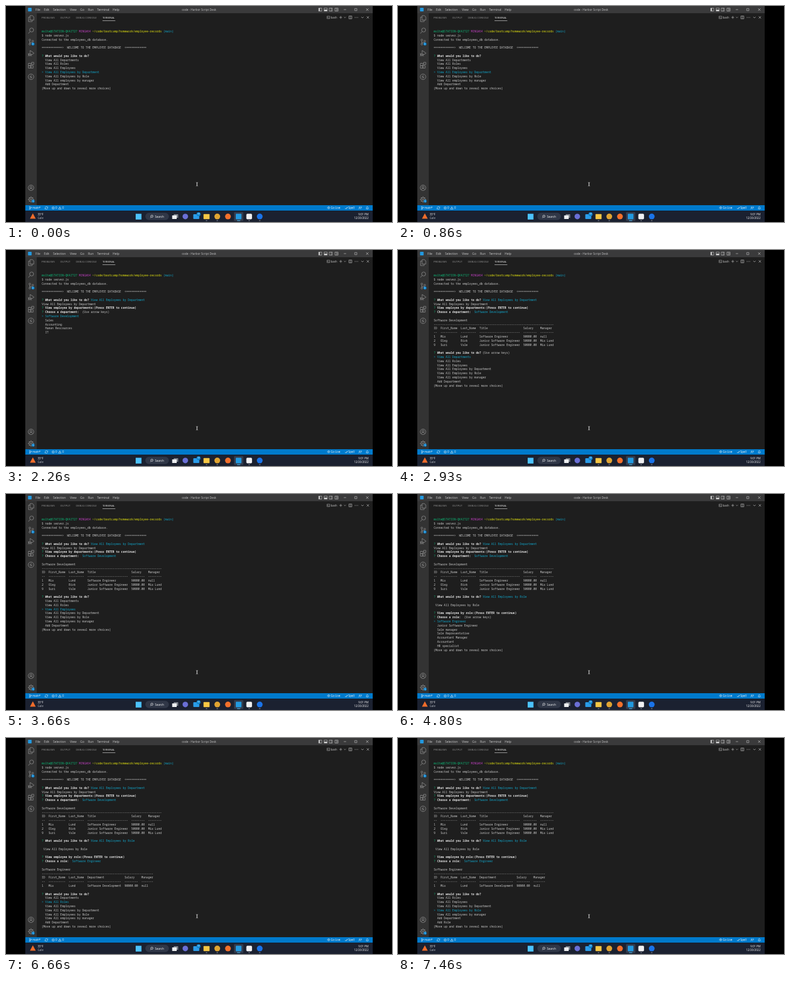
Write an HTML page with a canvas that moves like this. It is 640x360 px and loops after 8 s.

```html
<!DOCTYPE html>
<html lang="en">
<head>
<meta charset="utf-8">
<title>Terminal session</title>
<style>
html, body { margin: 0; width: 100%; height: 100%; overflow: hidden; background: #000; }
canvas { display: block; }
</style>
</head>
<body>
<canvas id="stage" width="640" height="360"></canvas>
<script>
const ctx = document.getElementById('stage').getContext('2d');
const LOOP = 8000;
const UI = '"Open Sans", sans-serif', MONO = '"Noto Sans Mono", monospace';
const PLAIN = '#cccccc', BOLD = '#e5e5e5', GREEN = '#0dbc79', CYAN = '#11a8cd',
      PURPLE = '#bc3fbc', YELLOW = '#e5e510', BLUE = '#007acc', GREY = '#9a9a9a';
const COLUMN = 2.8, ROW = 6.8;

// ---- drawing helpers ----
function rect(x, y, w, h, color, radius = 0) {
  ctx.fillStyle = color;
  ctx.beginPath();
  ctx.roundRect(x, y, w, h, radius);
  ctx.fill();
}

function disc(x, y, r, color) {
  ctx.fillStyle = color;
  ctx.beginPath();
  ctx.arc(x, y, r, 0, 7);
  ctx.fill();
}

function icon(x, y, path, color = PLAIN, width = 0.6) {
  ctx.save();
  ctx.translate(x, y);
  ctx.strokeStyle = color;
  ctx.lineWidth = width;
  ctx.stroke(new Path2D(path));
  ctx.restore();
}

const circle = (x, y, r) => `M${x + r} ${y}a${r} ${r} 0 1 0 ${-2 * r} 0a${r} ${r} 0 1 0 ${2 * r} 0`;
const box = (x, y, w, h) => `M${x} ${y}h${w}v${h}h${-w}z`;

// Laid out at ten times the size so that small glyph advances are not rounded.
function text(str, x, y, color = PLAIN, size = 5, { font = UI, weight = 400, align = 'left' } = {}) {
  ctx.save();
  ctx.scale(0.1, 0.1);
  ctx.font = `${weight} ${size * 10}px ${font}`;
  ctx.textAlign = align;
  ctx.fillStyle = color;
  ctx.fillText(str, x * 10, y * 10);
  ctx.restore();
}

function badge(x, y, label, r = 2.5) {
  disc(x, y, r, '#0a84d0');
  text(label, x, y + 1.2, '#fff', 3.3, { align: 'center', weight: 600 });
}

// ---- window ----
function drawTitleBar() {
  rect(32, 0, 576, 12, '#3a3a3b');
  rect(36.5, 3, 6, 6, '#2299e0', 0.8);
  const menus = { File: 49, Edit: 63, Selection: 78, View: 106, Go: 123, Run: 136, Terminal: 151, Help: 177 };
  for (const name in menus) text(name, menus[name], 7.8);
  text('code - Harbor Script Desk', 320, 7.8, '#c4c4c4', 4.8, { align: 'center' });
  for (const x of [521, 530, 538.5, 548]) icon(x, 6, box(-2.6, -2.5, 5.2, 5));
  rect(518.6, 3.6, 2, 4.8, PLAIN);
  rect(527.6, 6, 4.8, 2.4, PLAIN);
  icon(538.5, 6, 'M.7-2.5v5');
  icon(548, 6, 'M0-2.5v5M0 0h2.6');
  icon(562, 6, 'M-2 0h4');
  icon(580, 6, box(-1.8, -1.8, 3.6, 3.6));
  icon(599, 6, 'M-2-2l4 4M2-2l-4 4');
}

function drawActivityBar() {
  rect(32, 12, 19, 320, '#333333');
  const x = 41.5, color = '#8e8e8e';
  icon(x, 21, 'M-1.6-5h4l2.2 2.2v5.2h-6.2zM-1.6-2.5h-2.6v7.5h6v-2.5', color, 0.8);
  icon(x, 41, circle(1, -1, 3.3) + 'M-1.4 1.4l-3 3.4', color, 0.8);
  icon(x, 60, circle(-2, -3.4, 1.4) + circle(-2, 3.6, 1.4) + circle(2.8, -1.4, 1.4) + 'M-2-2v4.2M2.8 0c0 1.6-4.8.6-4.8 2', color, 0.8);
  icon(x, 79, 'M-1.5-1v-4l6.5 4.6-4.5 3' + circle(-2, 2, 2) + 'M-5 0l1.4 1M-5 4.5l1.4-1M1 4.5l-1.4-1M-5 2h6', color, 0.8);
  icon(x, 98.5, box(-4.4, -3, 4, 4) + box(-4.4, 1, 4, 4) + box(-0.4, 1, 4, 4) + box(1, -4.6, 3.6, 3.6), color, 0.8);
  icon(x, 118, circle(0, 0, 4.6) + 'M.8-3l-2.6 3.4h3.4l-2.4 2.8', color, 0.8);
  icon(x, 303, circle(0, 0, 4.6) + circle(0, -1, 1.7) + 'M-3 3.3c.6-3 5.4-3 6 0', color, 0.8);
  icon(x, 322.5, circle(0, 0, 3.5) + circle(0, 0, 1.3) + 'M0-5v1.5M0 3.5v1.5M-5 0h1.5M3.5 0h1.5M-3.5-3.5l1 1M2.5 2.5l1 1M-3.5 3.5l1-1M2.5-2.5l1-1', color, 0.9);
  badge(44.7, 63.3, '1');
  badge(45, 325.3, '1');
}

function drawPanelTabs() {
  const tabs = { PROBLEMS: 59, OUTPUT: 90, 'DEBUG CONSOLE': 116, TERMINAL: 160 };
  for (const name in tabs) text(name, tabs[name], 20.7, name === 'TERMINAL' ? '#e7e7e7' : GREY, 4.2);
  rect(160, 24.2, 21.3, 0.6, '#e7e7e7');
  icon(534.5, 19, box(-2.3, -2, 4.6, 4) + 'M-1.3-1l1 1-1 1M.2 1h1.2', PLAIN, 0.5);
  text('bash', 538.5, 20.7, PLAIN, 4.6);
  icon(555, 19, 'M-2.3 0h4.6M0-2.3v4.6');
  icon(562, 19, 'M-1.4-.7l1.4 1.4 1.4-1.4');
  icon(571, 19, box(-2.4, -2.3, 4.8, 4.6) + 'M0-2.3v4.6');
  for (const x of [578.8, 581, 583.2]) disc(x, 19, 0.5, PLAIN);
  icon(591, 19, 'M-2-1l2 2 2-2');
  icon(600, 19, 'M-1.9-1.9l3.8 3.8M1.9-1.9l-3.8 3.8');
}

function drawStatusBar() {
  rect(32, 332, 576, 9.2, BLUE);
  const white = '#fff', y = 336.6, base = 338.3;
  icon(40.5, y, circle(-1, -1.7, 0.7) + circle(-1, 1.7, 0.7) + circle(1.3, -0.8, 0.7) + 'M-1-1v2M1.3 0c0 .9-2.3.4-2.3 1', white, 0.5);
  text('main*', 44, base, white, 4.6);
  icon(67, y, 'M-2.2-.4a2.2 2.2 0 0 1 4.2-.4M2.2.4a2.2 2.2 0 0 1-4.2.4M2.3-2v1.4h-1.4M-2.3 2v-1.4h1.4', white, 0.5);
  icon(78.3, y, circle(0, 0, 2) + 'M-.8-.8l1.6 1.6M.8-.8l-1.6 1.6', white, 0.5);
  text('0', 82, base, white, 4.6);
  icon(89.2, y, 'M0-2l2.2 4h-4.4zM0-.7v1.3', white, 0.5);
  text('0', 93.2, base, white, 4.6);
  icon(535, y, circle(0, -0.3, 0.6) + 'M-1.2 1.2a1.9 1.9 0 1 1 2.4 0M0 .3v2', white, 0.5);
  text('Go Live', 538.6, base, white, 4.6);
  icon(564, y, 'M-2 .2l1.2 1.4 2.8-3.2M-.2 1l.6.6 2.4-3', white, 0.5);
  text('Spell', 567.5, base, white, 4.6);
  icon(587, y, circle(-0.6, -1, 0.9) + 'M-2.2 2c.2-2.4 3-2.4 3.2 0M1.2-1.8h1.2v1.8h-1.2', white, 0.5);
  icon(599, y, 'M-2 1.3h4l-.7-1v-1.1a1.3 1.3 0 0 0-2.6 0v1.1zM-.5 2.1h1', white, 0.5);
}

function drawTaskbar() {
  rect(32, 341.2, 576, 18.8, '#1b2130');
  ctx.fillStyle = '#ee6c2b';
  ctx.fill(new Path2D('M44.5 345.5l4.8 9h-9.6z'));
  text('33°F', 52.5, 349.2, '#fff', 4.5);
  text('Gale', 52.5, 355.2, '#b4b8c0', 4.5);

  rect(215, 346.3, 9.6, 9.6, '#4cc2ff');
  rect(231, 344.8, 39, 12, '#303747', 6);
  icon(241.5, 350.8, circle(0.4, -0.4, 1.8) + 'M-1 1l-1.4 1.4', '#fff', 0.7);
  text('Search', 247, 352.6, '#fff', 4.7);

  rect(378, 343.5, 15.5, 14.8, '#343c4d', 1.5);
  rect(278, 347, 7.5, 6, '#7c828c', 0.6);
  rect(275.5, 349, 7.5, 6, '#eceef0', 0.6);
  disc(297.3, 350.8, 4.6, '#6a6fd6');
  rect(310.5, 347, 10, 8, '#2a9be8', 1);
  rect(327.5, 346.8, 10, 8.4, '#f6c744', 0.8);
  disc(350.3, 350.8, 4.8, '#e0a432');
  disc(368, 350.8, 4.8, '#f3702b');
  rect(381, 346.2, 9.4, 9.4, '#2299e0', 1);
  rect(398.5, 346.2, 9.4, 9.4, '#f0f0f2', 1.8);
  disc(420.7, 350.8, 4.8, '#1a73e8');
  badge(319.3, 347, '17', 3.3);
  for (const x of [332.5, 350.3, 403.2, 420.7]) rect(x - 1.2, 357.3, 2.4, 0.9, '#9aa0aa', 0.4);
  rect(383, 357.3, 5.6, 0.9, '#4cc2ff', 0.4);

  text('9:01 PM', 601, 349.2, '#fff', 4.5, { align: 'right' });
  text('12/20/2022', 601, 355.2, '#fff', 4.5, { align: 'right' });
}

// ---- terminal ----
const ACTIONS = ['View All Departments', 'View All Roles', 'View All Employees',
  'View All Employees by Department', 'View All Employees by Role',
  'View All employees by manager', 'Add Department', 'Add Role'];
const DEPARTMENTS = ['Software Development', 'Sales', 'Accounting', 'Human Rescources', 'IT'];
const ROLES = ['Software Engineer', 'Junior Software Engineer', 'Sale manager',
  'Sale Representative', 'Accountant Manager', 'Accountant', 'HR specialist', 'IT specialist'];
const ARROWS = '(Use arrow keys)';

// Pairs of string and colour, set one after another.
function row(n, ...parts) {
  let column = 0;
  for (let i = 0; i < parts.length; i += 2) {
    const [str, color = PLAIN] = [parts[i], parts[i + 1]];
    text(str, 59.3 + column * COLUMN, 43.9 + n * ROW, color, COLUMN / 0.6,
      { font: MONO, weight: color === BOLD ? 700 : 400 });
    column += str.length;
  }
}

const ask = (n, question, tail = '', color = PLAIN) =>
  row(n, '? ', GREEN, question + ' ', BOLD, tail, color);

function list(n, items, selected = 0) {
  const first = Math.max(0, selected - 3), shown = items.slice(first, first + 7);
  shown.forEach((item, i) => {
    const active = first + i === selected;
    row(n + i, (active ? '> ' : '  ') + item, active ? CYAN : PLAIN);
  });
  if (items.length > 7) row(n + 7, '(Move up and down to reveal more choices)');
}

function mainMenu(n, selected) {
  ask(n, 'What would you like to do?', selected ? '' : ARROWS);
  list(n + 1, ACTIONS, selected);
}

function table(n, title, widths, records) {
  const line = cells => cells.map((cell, i) => cell.padEnd(widths[i])).join('  ');
  const rules = widths.map(w => '-'.repeat(w));
  row(n, title);
  row(n + 1, '-'.repeat(rules.join('  ').length));
  row(n + 2, line(records[0]));
  row(n + 3, line(rules));
  records.slice(1).forEach((record, i) => row(n + 4 + i, line(record)));
}

function drawTerminal(t) {
  const presses = times => times.filter(ms => t >= ms).length;

  row(0, 'molte@STATION-QK4ZT27 ', GREEN, 'MINGW64 ', PURPLE,
    '~/code/bootcamp/homework/employee-records ', YELLOW, '(main)', CYAN);
  row(1, '$ node server.js');
  row(2, 'Connected to the employees_db database.');
  row(4, '============>  WELCOME TO THE EMPLOYEE DATABASE  <============');

  if (t < 1330) return mainMenu(6, 3);
  ask(6, 'What would you like to do?', ACTIONS[3], CYAN);
  row(7, ACTIONS[3]);
  ask(8, 'View employee by departments:(Press ENTER to continue)');
  if (t < 1930) return;
  if (t < 2800) {
    ask(9, 'Choose a department:', ' ' + ARROWS);
    return list(10, DEPARTMENTS);
  }
  ask(9, 'Choose a department:', ' ' + DEPARTMENTS[0], CYAN);
  table(11, DEPARTMENTS[0], [2, 10, 9, 24, 8, 8], [
    ['ID', 'First_Name', 'Last_Name', 'Title', 'Salary', 'Manager'],
    ['1', 'Mia', 'Lund', ROLES[0], '90000.00', 'null'],
    ['2', 'Oleg', 'Birk', ROLES[1], '50000.00', 'Mia Lund'],
    ['9', 'Suri', 'Vale', ROLES[1], '50000.00', 'Mia Lund']]);

  if (t < 4330) return mainMenu(19, presses([3330, 3530, 3800, 4060]));
  ask(19, 'What would you like to do?', ACTIONS[4], CYAN);
  row(21, ' ' + ACTIONS[4]);
  ask(23, 'View employee by role:(Press ENTER to continue)');
  if (t < 4660) return;
  if (t < 5930) {
    ask(24, 'Choose a role:', ' ' + ARROWS);
    return list(25, ROLES);
  }
  ask(24, 'Choose a role:', ' ' + ROLES[0], CYAN);
  table(26, ROLES[0], [2, 10, 9, 20, 8, 7], [
    ['ID', 'First_Name', 'Last_Name', 'Department', 'Salary', 'Manager'],
    ['1', 'Mia', 'Lund', DEPARTMENTS[0], '90000.00', 'null']]);
  mainMenu(32, presses([6660, 6860, 7130, 7460]));
}

function draw(now) {
  rect(0, 0, 640, 360, '#000');
  rect(32, 12, 576, 320, '#1e1e1e');
  drawTitleBar();
  drawActivityBar();
  drawPanelTabs();
  drawTerminal(now % LOOP);
  drawStatusBar();
  drawTaskbar();
  icon(316.7, 297, 'M-1.5-3q1.5 0 1.5 1v4q0 1-1.5 1M1.5-3q-1.5 0-1.5 1v4q0 1 1.5 1', '#e0e0e0', 0.7);
  requestAnimationFrame(draw);
}
requestAnimationFrame(draw);
</script>
</body>
</html>
```
